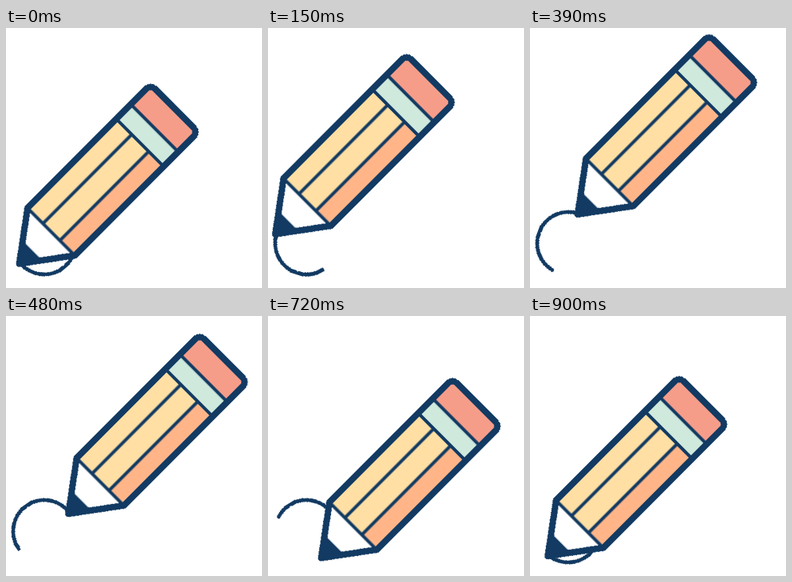
An HTML page without scripts for the animation above (930 ms loop, 321 by 325 pixels).

```html
<!DOCTYPE html>
<html lang="en">
<head>
<meta charset="utf-8">
<title>Pencil loader</title>
<style>
  html, body { margin: 0; width: 100%; height: 100%; overflow: hidden; background: #fff; }
  svg { display: block; width: 321px; height: 325px; }
  .ink { fill: none; stroke: #123a62; stroke-linecap: round; stroke-linejoin: round; }
  .crisp { shape-rendering: crispEdges; }
  .orbit, .spin, .trail { animation: 930ms steps(31) infinite; }
  .orbit { animation-name: orbit; }
  .spin { animation-name: spin; }
  .trail { animation-name: trail; }

  /* The pencil circles without turning. */
  @keyframes orbit {
    from { transform: rotate(139.5deg) translate(38.9px) rotate(-139.5deg); }
    to { transform: rotate(499.5deg) translate(38.9px) rotate(-499.5deg); }
  }
  @keyframes spin {
    from { transform: rotate(139.5deg); }
    to { transform: rotate(499.5deg); }
  }
  /* The line grows; its reset is hidden under the pencil. */
  @keyframes trail {
    from { stroke-dasharray: 120 360; }
    to { stroke-dasharray: 237 360; }
  }
</style>
</head>
<body>
<svg viewBox="0 0 321 325">
  <g transform="translate(48 269)">
    <g class="spin">
      <path class="ink crisp trail" stroke-width="4.8" pathLength="360"
            d="M39 0A39 39 0 0 0 -39 0A39 39 0 0 0 39 0"/>
    </g>
    <g class="orbit">
      <!-- Local x runs from the tip to the eraser. -->
      <g transform="translate(-1.8 .4) rotate(-45)">
        <path fill="#fff" d="M0 0L56.5 -41.8V41.8Z"/>
        <path fill="#123a62" d="M0 0L23.3 -17.2V17.2Z"/>
        <path fill="#ffdfa3" d="M56.5 -41.8H214V15.5H56.5Z"/>
        <path fill="#ffb588" d="M56.5 15.5H214V41.8H56.5Z"/>
        <path fill="#cfe9dd" d="M214 -41.8H239.8V41.8H214Z"/>
        <path fill="#f69d89" d="M239.8 -41.8H268L274.6 -35V35L268 41.8H239.8Z"/>
        <path class="ink" stroke-width="4"
              d="M56.5 -41.8V41.8M214 -41.8V41.8M239.8 -41.8V41.8M56.5 -14.4H214M56.5 15.5H214"/>
        <path class="ink crisp" stroke-width="8"
              d="M0 0L56.5 -41.8H267.8A6.8 6.8 0 0 1 274.6 -35V35A6.8 6.8 0 0 1 267.8 41.8H56.5Z"/>
      </g>
    </g>
  </g>
</svg>
</body>
</html>
```
